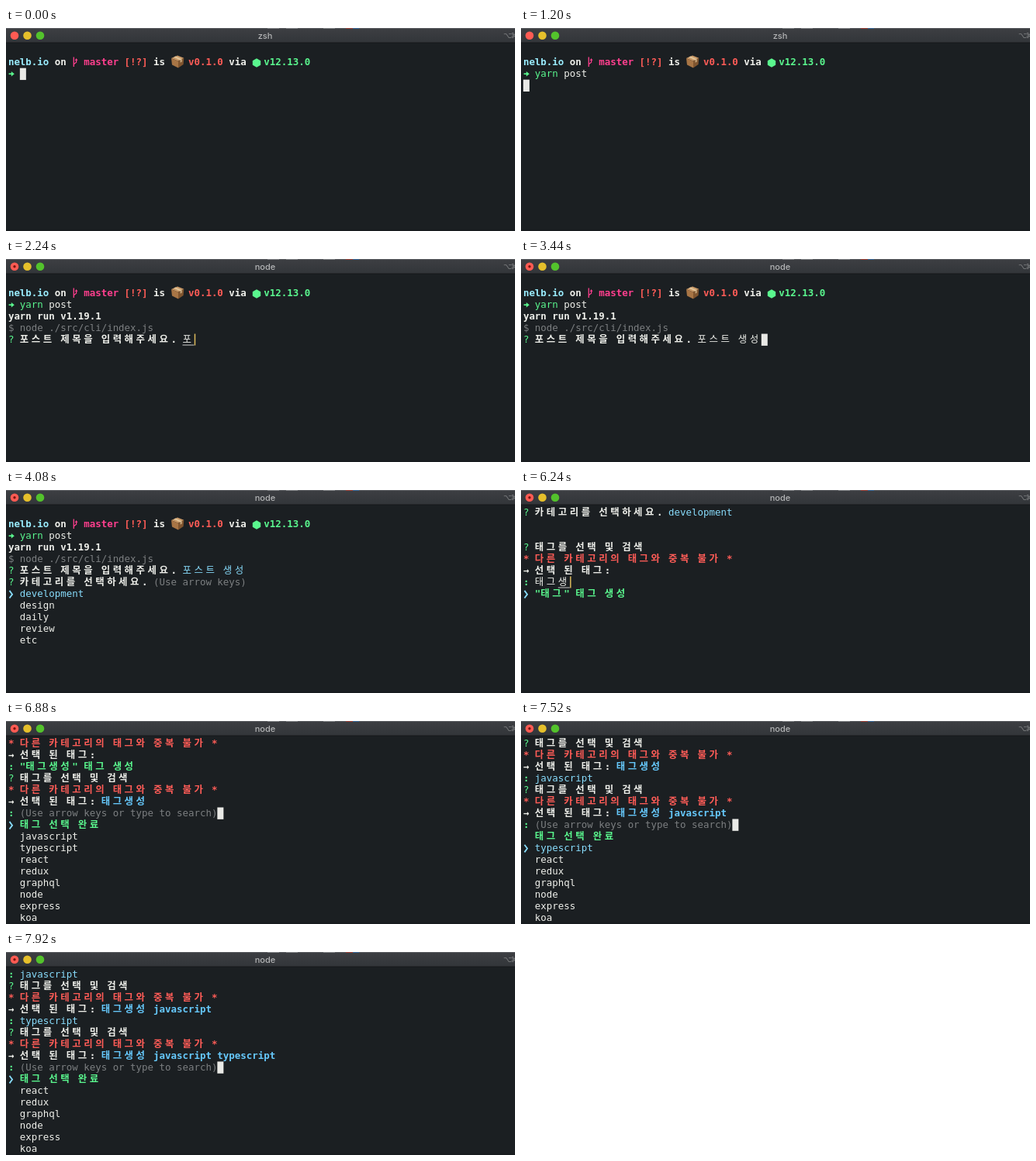
Write an HTML page with a canvas that moves like this. It is 656 by 262 pixels and loops after 8 s.

```html
<!DOCTYPE html>
<html lang="ko">
<head>
<meta charset="utf-8">
<title>Terminal</title>
<style>
  html, body { margin: 0; width: 100%; height: 100%; overflow: hidden; background: #1b1f22; }
  canvas { display: block; width: 656px; height: 262px; }
</style>
</head>
<body>
<canvas></canvas>
<script>
const W = 656, H = 262, LOOP = 8000;
const CELL = 7.485, ROW = 14.95, LEFT = 2.9, TOP = 21.8, ROWS = 16;
const MONO = '12.45px "DejaVu Sans Mono", monospace';
const HANGUL = '12.45px "Noto Sans CJK KR", "Noto Sans CJK", sans-serif';
const COLORS = {
  w: '#eff0eb', g: '#5af78e', r: '#ff5c57', c: '#88dcfc',
  b: '#66c9fd', m: '#ff3f8e', d: '#7c7f81', k: '#9aedfe'
};

const canvas = document.querySelector('canvas');
const ctx = canvas.getContext('2d');
const dpr = window.devicePixelRatio || 1;
canvas.width = W * dpr;
canvas.height = H * dpr;

// Markup: <x> sets a colour from COLORS, an upper-case letter also sets bold.
const PROMPT = '<K>nelb.io <W>on   <M>master <R>[!?] <W>is    <R>v0.1.0 <W>via   <G>v12.13.0';
const TITLE_Q = '<g>? <W>포스트 제목을 입력해주세요. ';
const CATEGORY_Q = '<g>? <W>카테고리를 선택하세요. ';
const HINT = '(Use arrow keys or type to search)';
const CATEGORIES = ['development', 'design', 'daily', 'review', 'etc'];
const TAGS = ['javascript', 'typescript', 'react', 'redux', 'graphql', 'node', 'express', 'koa'];
const DONE = '<G>태그 선택 완료';

const KEY_TIMES = [160, 240, 320, 400, 640, 720, 840, 960, 1040];

// Input method steps: committed text | syllable being composed.
const TITLE_KEYS = ['|ㅍ', '|포', '|폿', '포|스', '포|슽', '포스|트', '포스트 |', '포스트 |ㅅ',
  '포스트 |새', '포스트 |생', '포스트 생|ㅅ', '포스트 생|서', '포스트 생|성'];
const TAG_KEYS = ['|ㅌ', '|태', '|택', '태|그', '태|긋', '태그|새', '태그|생', '태그생|ㅅ',
  '태그생|서', '태그생|성'];

const SCROLLS = [[0, 0], [4400, 6], [6880, 10], [7200, 13], [7760, 16]];

function typing(keys, t, start, gap, end) {
  if (t < start) return ['', ''];
  if (t >= end) return [keys.at(-1).replace('|', ''), ''];
  return keys[Math.min(Math.floor((t - start) / gap), keys.length - 1)].split('|');
}

const tagHead = chosen => [
  '<g>? <W>태그를 선택 및 검색',
  '<R>* 다른 카테고리의 태그와 중복 불가 *',
  '<W>→ 선택 된 태그: <B>' + chosen
];

const menu = (items, active) => items.map((item, i) =>
  i === active ? '<c>❯ ' + item : '  ' + item);

function terminal(t) {
  const lines = ['', PROMPT];
  const state = { lines, cursor: null, composing: '', scroll: 0 };
  for (const [time, scroll] of SCROLLS) if (t >= time) state.scroll = scroll;

  const add = (...more) => lines.push(...more);
  const cursorHere = () => {
    state.cursor = [lines.length - 1, columns(lines.at(-1))];
    return state;
  };

  const command = 'yarn post'.slice(0, KEY_TIMES.filter(k => t >= k).length);
  add('  ' + (command.length < 4 ? '<R>' : '<g>') + command.slice(0, 4) + '<w>' + command.slice(4));
  if (t < 1200) return cursorHere();

  if (t >= 1440) add('<W>yarn run v1.19.1');
  if (t >= 1600) add('<d>$ node ./src/cli/index.js');
  if (t < 1840) {
    add('');
    return cursorHere();
  }

  const [title, composing] = typing(TITLE_KEYS, t, 2080, 90, 3360);
  add(TITLE_Q + (t < 3600 ? '<w>' : '<c>') + title);
  if (t < 3600) {
    state.composing = composing;
    return cursorHere();
  }

  if (t < 4320) {
    add(CATEGORY_Q + '<d>(Use arrow keys)', ...menu(CATEGORIES, 0));
    return state;
  }
  add(CATEGORY_Q + '<c>development');
  if (t < 4400) {
    add('');
    return cursorHere();
  }

  const search = (input, items, active) => {
    add('<G>: ' + (input ? '<w>' + input : '<d>' + HINT));
    cursorHere();
    add(...menu(items, active));
    return state;
  };

  add('', '', ...tagHead(''));
  if (t < 6880) {
    const [tag, part] = typing(TAG_KEYS, t, 5840, 65, 6600);
    state.composing = part;
    return search(tag, tag ? [`<G>"${tag}" 태그 생성`] : [DONE, ...TAGS], 0);
  }
  add('<G>: "태그생성" 태그 생성', ...tagHead('태그생성'));
  if (t < 7200) return search('', [DONE, ...TAGS], t < 7040 ? 0 : 1);
  add('<G>: <c>javascript', ...tagHead('태그생성 javascript'));
  if (t < 7760) return search('', [DONE, ...TAGS.slice(1)], t < 7520 ? 0 : 1);
  add('<G>: <c>typescript', ...tagHead('태그생성 javascript typescript'));
  return search('', [DONE, ...TAGS.slice(2)], 0);
}

const isWide = ch => /[ㄱ-ㅎㅏ-ㅣ가-힣]/.test(ch);
const columns = line => [...line.replace(/<\w>/g, '')].reduce((n, ch) => n + (isWide(ch) ? 2 : 1), 0);
const cellX = col => LEFT + col * CELL;
const rowY = row => TOP + row * ROW;

function rect(color, x, y, w, h) {
  ctx.fillStyle = color;
  ctx.fillRect(x, y, w, h);
}

function disc(color, x, y, r) {
  ctx.fillStyle = color;
  ctx.beginPath();
  ctx.arc(x, y, r, 0, Math.PI * 2);
  ctx.fill();
}

function polygon(color, ...points) {
  ctx.fillStyle = color;
  ctx.beginPath();
  points.forEach(([x, y]) => ctx.lineTo(x, y));
  ctx.fill();
}

function stroke(color, width, path) {
  ctx.strokeStyle = color;
  ctx.lineWidth = width;
  ctx.stroke(new Path2D(path));
}

function text(color, font, string, x, y) {
  ctx.fillStyle = color;
  ctx.font = font;
  ctx.fillText(string, x, y);
}

function drawLine(line, row, col = 0) {
  let style = 'w';
  line.split(/<(\w)>/).forEach((part, i) => {
    if (i % 2) {
      style = part;
      return;
    }
    const key = style.toLowerCase();
    const weight = style === key ? '' : 'bold ';
    for (const ch of part) {
      const wide = isWide(ch), x = cellX(col), y = rowY(row);
      if (ch === '❯') {
        stroke(COLORS.c, 1.8, `M${x + 1.6} ${y + 3.4}l3.6 4.8l-3.6 4.8`);
      } else if (ch !== ' ') {
        text(COLORS[key], weight + (wide ? HANGUL : MONO), ch, x, y + 11.5);
      }
      col += wide ? 2 : 1;
    }
  });
}

function drawPromptIcons() {
  stroke(COLORS.m, 1.3, 'M87.3 37.5V50M87.3 46.8L90.6 44.2V40.5');
  polygon(COLORS.m, [88.8, 42], [90.6, 39], [92.4, 42]);

  polygon('#c99a68', [213, 39], [221, 35.5], [229.3, 38.8], [222, 42.8]);
  polygon('#a87545', [213, 39], [222, 42.8], [222, 51.6], [214, 47.4]);
  polygon('#80552f', [229.3, 38.8], [222, 42.8], [222, 51.6], [228.6, 47]);
  polygon('#e3c79c', [216.2, 37.6], [218.4, 36.6], [226.8, 40.2], [224.6, 41.4]);
  polygon('#c6a77d', [224.6, 41.4], [226.8, 40.2], [226.8, 43.6], [224.6, 44.8]);

  polygon(COLORS.g, [323, 39.3], [328.2, 42.2], [328.2, 47.8], [323, 50.7], [317.8, 47.8], [317.8, 42.2]);

  stroke(COLORS.g, 1.7, 'M3.6 59.2H8');
  polygon(COLORS.g, [6.8, 56], [10.8, 59.2], [6.8, 62.4]);
}

function drawWindow(t) {
  rect('#1b1f22', 0, 0, W, H);
  const bar = ctx.createLinearGradient(0, 0, 0, 19);
  bar.addColorStop(0, '#3d3f43');
  bar.addColorStop(1, '#323539');
  rect(bar, 0, 0, W, 19);
  rect('#16191b', 0, 18.5, W, 1);
  rect('#606266', 0, 0, W, 1);
  for (const x of [337, 361, 409]) rect('#8a8c8f', x, 0, 15, 1);
  rect('#a4483f', 438, 0, 9, 1);
  rect('#3f6fa0', 447, 0, 8, 1);
  rect('#181c1f', 0, 260, W, 2);

  const running = t >= 1360;
  disc('#ff5b53', 11, 9.8, 5.3);
  disc('#e6c02b', 27.5, 9.8, 5.3);
  disc('#53c22c', 44, 9.8, 5.3);
  if (running) disc('#7a1410', 11, 9.8, 1.7);

  ctx.textAlign = 'center';
  text('#b4b5b6', '500 11px Inter, sans-serif', running ? 'node' : 'zsh', 334, 13.8);
  ctx.textAlign = 'left';
  const small = '9.5px "DejaVu Sans", sans-serif';
  text('#818385', small, '⌥', 641, 13.3);
  text('#818385', small, '⌘', 650.5, 13.3);
}

function drawCursor({ cursor, composing, scroll }) {
  if (!cursor) return;
  const row = cursor[0] - scroll, x = cellX(cursor[1]), y = rowY(row);
  if (!composing) {
    rect('#e9e9e6', x, y, 8, ROW + 0.4);
    return;
  }
  const width = CELL * 2;
  rect('#1b1f22', x, y, width, ROW);
  drawLine(composing, row, cursor[1]);
  rect('#c9cac8', x, y + 14, width, 1);
  rect('#dcb95c', x + width + 0.3, y, 1.5, ROW);
}

function draw(t) {
  ctx.setTransform(dpr, 0, 0, dpr, 0, 0);
  drawWindow(t);
  const state = terminal(t);
  state.lines.slice(state.scroll, state.scroll + ROWS).forEach((line, row) => drawLine(line, row));
  if (!state.scroll) drawPromptIcons();
  drawCursor(state);
}

const start = performance.now();
function tick() {
  draw((performance.now() - start) % LOOP);
  requestAnimationFrame(tick);
}
tick();
</script>
</body>
</html>
```
